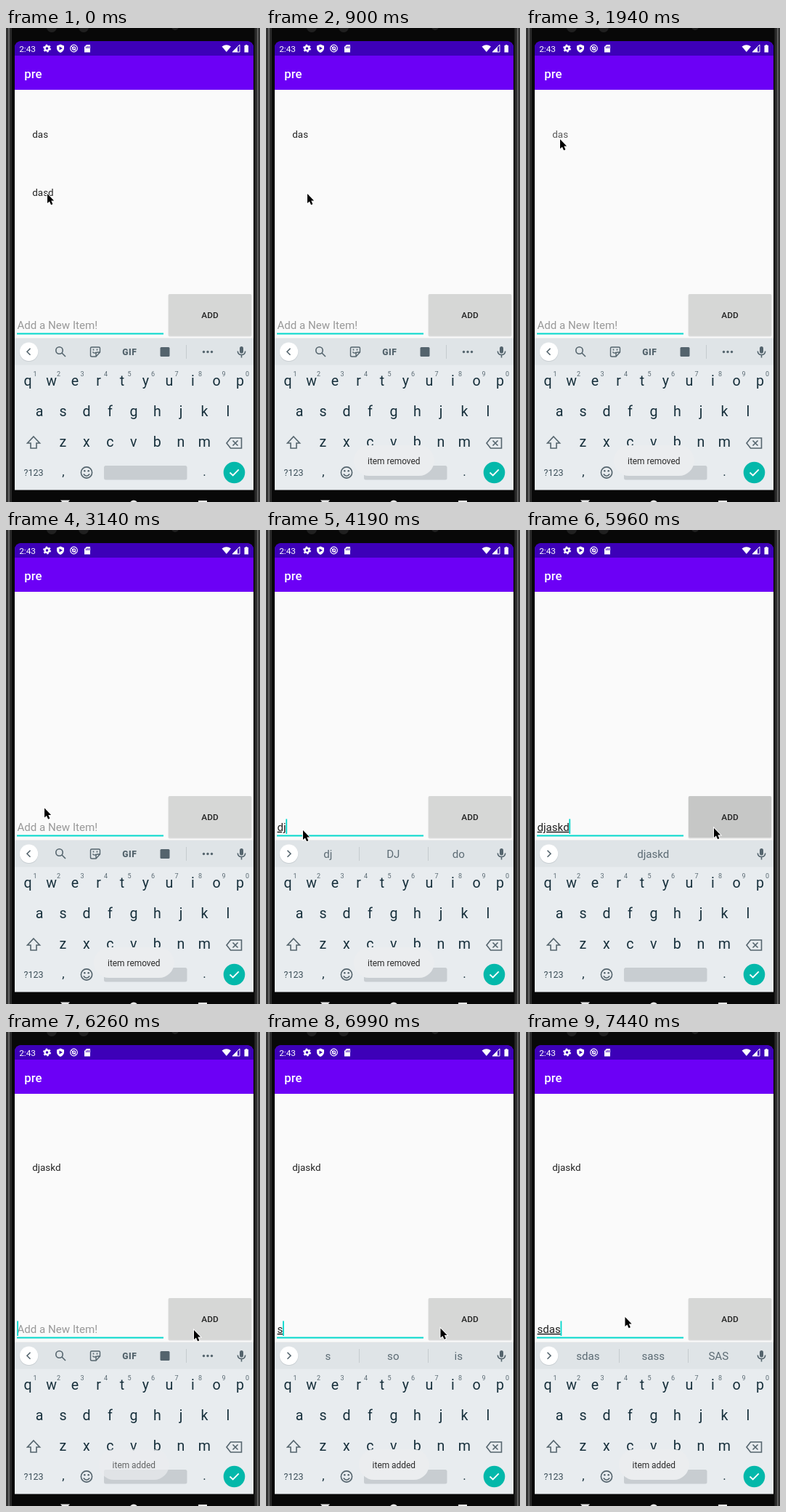
An HTML page that plays this animation: 350 px wide and 652 px high, repeating every 8000 ms.

```html
<!DOCTYPE html>
<html lang="en">
<head>
<meta charset="utf-8">
<title>List app</title>
<style>
html, body { margin: 0; width: 100%; height: 100%; overflow: hidden; background: #050505; }
svg { display: block; width: 100%; height: 100%; font-family: Roboto, sans-serif; }
.mid { text-anchor: middle; }
.line { fill: none; stroke: #54646d; stroke-width: 1.6; }
.key { font-size: 19.6px; fill: #17303c; text-anchor: middle; }
.dot { font-size: 17px; fill: #17303c; text-anchor: middle; }
.digit { font-size: 9px; fill: #5a6a73; text-anchor: middle; }
.item { font-size: 13.4px; fill: #222; }
.field { font-size: 15.1px; }
.word { font-size: 15.1px; fill: #5c6b74; text-anchor: middle; }
#typed { fill: #222; text-decoration: underline; text-decoration-skip-ink: none; }
</style>
</head>
<body>
<svg viewBox="0 0 350 652" preserveAspectRatio="none">
  <!-- phone body -->
  <rect width="350" height="652" fill="#080808"/>
  <g fill="#202020">
    <circle cx="63" cy="-1" r="7"/><circle cx="107" cy="-1" r="7"/><circle cx="233" cy="-2" r="5"/>
  </g>
  <path d="M1.500 0V652M348.500 0V652" stroke="#333" stroke-width="3"/>
  <path d="M4 0V652M346.500 0V652" stroke="#666" stroke-width="2"/>
  <path d="M6.500 0V652M344 0V652" stroke="#2a2a2a" stroke-width="3"/>
  <path d="M12 85V28Q12 18 22 18H331Q341 18 341 28V85Z" fill="#6c00f6"/>
  <path d="M12 38V28Q12 18 22 18H331Q341 18 341 28V38Z" fill="#3d00b8"/>
  <rect x="12" y="85" width="329" height="342" fill="#fafafa"/>
  <g fill="#e6e6e6">
    <path d="M75 649.5H88L81.5 657Z"/><circle cx="176" cy="655" r="5.5"/><rect x="265" y="650" width="12" height="8"/>
  </g>

  <!-- status bar -->
  <g fill="#fff">
    <text x="18.2" y="32.5" font-size="11.8">2:43</text>
    <text x="25.3" y="68.5" font-size="16.8" font-weight="500">pre</text>
    <g fill="none" stroke="#fff">
      <circle cx="56.5" cy="28" r="3" stroke-width="2.4"/>
      <circle cx="56.5" cy="28" r="4.7" stroke-width="1.6" stroke-dasharray="2.4 2.52"/>
      <circle cx="93.5" cy="28" r="4.8" stroke-width="1.2"/>
      <circle cx="93.5" cy="28" r="2.1" stroke-width="1.2"/>
      <path d="M90 25L97 32"/>
    </g>
    <path d="M75 22.5L80 24.5V28Q79.5 32 75 34Q70.5 32 70 28V24.5Z"/>
    <path d="M73.5 25.5L78 28L73.5 30.5Z" fill="#3d00b8"/>
    <path d="M111 23H116V33.5H108V26Z"/>
    <path d="M110.5 25.5V28M112.5 25V28M114.5 25V28" stroke="#3d00b8"/>
    <path d="M297.5 25.5Q303.8 20.8 310 25.5L303.8 33Z"/>
    <path d="M312 33L322 23V33Z" fill="none" stroke="#fff"/><path d="M312 33L319 26V33Z"/>
    <path d="M328.5 24H330V23H332.5V24H334V33.5H328.5Z"/>
  </g>

  <!-- list and input -->
  <text id="das" class="item" x="36.3" y="150.5">das</text>
  <text id="dasd" class="item" x="36.3" y="231">dasd</text>
  <text id="added" class="item" x="36.3" y="190.5">djaskd</text>
  <rect x="223.5" y="366" width="115" height="58.5" rx="2" opacity=".12"/>
  <rect id="button" x="224" y="366" width="114" height="57" rx="2"/>
  <text class="mid" x="281" y="398.8" font-size="11.8" font-weight="500" fill="#222">ADD</text>
  <text id="hint" class="field" x="15.5" y="413.8" fill="#989898">Add a New Item!</text>
  <text id="typed" class="field" x="15.5" y="413.8"></text>
  <rect x="15" y="419.5" width="202" height="2" fill="#03d8cc"/>
  <rect id="caret" y="397.5" width="1.8" height="20.5" fill="#03d8cc"/>

  <!-- keyboard -->
  <rect x="12" y="426" width="329" height="1" fill="#eee"/>
  <rect x="12" y="427" width="329" height="208.5" fill="#e8ecef"/>
  <rect x="12" y="427" width="329" height="36.5" fill="#dfe4e7"/>
  <circle cx="31.5" cy="446" r="13" fill="#b9c0c5" opacity=".6"/>
  <circle cx="31.5" cy="445.3" r="12.7" fill="#fff"/>
  <path id="chevron" class="line"/>
  <g id="tools">
    <g class="line">
      <circle cx="73.5" cy="443.5" r="4.7"/><path d="M77 447L82 452"/>
      <path d="M118 439H128Q129.5 439 129.5 440.5V446L124 452H118.5Q116.5 452 116.5 450.5V440.5Q116.5 439 118 439ZM129 446H126Q124 446 124 448V451M119.5 445.5Q121.5 448.5 124 446" stroke-width="1.4"/>
      <path d="M120.5 441.5V443.5M125.5 441.5V443.5"/>
    </g>
    <g fill="#54646d">
      <text class="mid" x="170.3" y="449.5" font-size="12" font-weight="800" letter-spacing=".5">GIF</text>
      <rect x="212.5" y="439" width="13" height="13" rx="1.5"/>
      <circle cx="272.5" cy="445.5" r="1.7"/><circle cx="278" cy="445.5" r="1.7"/><circle cx="283.5" cy="445.5" r="1.7"/>
    </g>
    <path d="M248.5 436V455" stroke="#c5cbcf"/>
  </g>
  <g id="words">
    <path id="bars" d="M128.5 436V455M223.5 436V455" stroke="#c5cbcf"/>
    <text class="word" x="85.3" y="451.3"></text>
    <text class="word" x="175.3" y="451.3"></text>
    <text class="word" x="265.3" y="451.3"></text>
  </g>
  <rect x="322" y="438" width="5" height="9.5" rx="2.5" fill="#54646d"/>
  <path class="line" d="M319.3 444.5Q319.5 449.5 324.5 449.5Q329.5 449.5 329.7 444.5M324.5 449.5V453.5" stroke-width="1.4"/>
  <g id="keys"></g>
  <g class="line">
    <path d="M38 562L46.5 571H42V578H34V571H29.5Z"/>
    <path d="M309.5 564H324.5V578H309.5L304 571ZM312.5 567.5L319.5 574.5M319.5 567.5L312.5 574.5"/>
    <circle cx="111" cy="611.5" r="7.6"/><path d="M106.8 613.5Q111 619 115.2 613.5"/>
  </g>
  <circle cx="108.3" cy="609.3" r="1.3" fill="#54646d"/><circle cx="113.7" cy="609.3" r="1.3" fill="#54646d"/>
  <text class="mid" x="38" y="616.2" font-size="12.5" fill="#3c4f59">?123</text>
  <rect x="135" y="602" width="114.5" height="19.5" rx="2.5" fill="#c8cdd1"/>
  <circle cx="314.5" cy="611.5" r="14.8" fill="#03b8aa"/>
  <path d="M308.5 611.5L312.7 615.5L320.7 607.3" fill="none" stroke="#fff" stroke-width="1.8"/>

  <g id="toast">
    <rect y="574" height="42" rx="21" fill="#ebedef"/>
    <text class="mid" x="176.3" y="600" font-size="11.9" fill="#2a2a2a"></text>
  </g>
  <path id="pointer" d="M.5 1.5V14.5L3.4 11.9L5.6 16.8L7.9 15.8L5.8 11H9.6Z" stroke="#fff" stroke-width="1.8" paint-order="stroke"/>
</svg>
<script>
const $ = id => document.getElementById(id);

function addKey(cls, x, y, label) {
  const el = document.createElementNS('http://www.w3.org/2000/svg', 'text');
  el.setAttribute('class', cls);
  el.setAttribute('x', x);
  el.setAttribute('y', y);
  el.textContent = label;
  $('keys').append(el);
}
[['qwertyuiop', 30, 492], ['asdfghjkl', 46, 533.5], ['zxcvbnm', 78.3, 576.3]].forEach(([row, x, y]) =>
  [...row].forEach((c, i) => addKey('key', x + 32.5 * i, y, c)));
[...'1234567890'].forEach((c, i) => addKey('digit', 40 + 32.5 * i, 478.5, c));
addKey('dot', 79, 616, ',');
addKey('dot', 273.5, 616, '.');

// Each track holds [start time, value]; a value lasts until the next start.
const tracks = {
  pointer: [[0, [56.5, 226.5]], [1200, [50, 180]], [1340, [46.5, 151.5]],
    [2840, [48, 195]], [2990, [51, 305]], [3140, [52.5, 381]], [3290, [52, 403]], [3440, [50.5, 411.5]],
    [5220, [82.5, 420.5]], [5370, [150, 431]], [5520, [225, 423]], [5670, [258.5, 408.5]],
    [6990, [240, 406]], [7140, [190, 398]], [7290, [150, 392]], [7440, [136, 390.5]]],
  caret: [[0, 0], [450, 1], [900, 0], [1340, 1], [1940, 0], [2390, 1], [2840, 0], [3440, 1], [3890, 0],
    [4190, 1], [5220, 0], [5670, 1], [6690, 0], [6990, 1]],
  das: [[0, 1], [1940, .75], [2090, 0]],
  dasd: [[0, 1], [450, .75], [600, 0]],
  added: [[0, 0], [6110, 1]],
  toast: [[0, 0], [600, .6], [750, 1], [2390, .5], [2540, 0], [2840, .6], [2990, 1], [4630, .5], [4780, 0],
    [6260, .7], [6400, 1]],
  button: [[0, '#d6d7d6'], [5960, '#c6c7c6'], [6110, '#cbcccb'], [6260, '#d6d7d6']],
  typed: [[0, ''], [4190, 'dj'], [4340, 'dja'], [4490, 'djas'], [4630, 'djask'], [4780, 'djaskd'],
    [6110, ''], [6990, 's'], [7140, 'sd'], [7290, 'sda'], [7440, 'sdas']]
};
const suggestions = {
  dj: 'dj DJ do', dja: 'dja DJ da', djas: 'djas das DJs',
  s: 's so is', sd: 'sd SD as', sda: 'sda SDA sad', sdas: 'sdas sass SAS'
};
const at = (name, t) => tracks[name].findLast(([start]) => start <= t)[1];
const show = (id, on) => $(id).style.opacity = +on;

function draw(t) {
  const typed = at('typed', t), words = suggestions[typed]?.split(' ') ?? ['', typed, ''];
  for (const id of ['das', 'dasd', 'added', 'toast', 'caret']) show(id, at(id, t));
  $('pointer').setAttribute('transform', `translate(${at('pointer', t)})`);
  $('button').style.fill = at('button', t);

  $('typed').textContent = typed;
  $('caret').setAttribute('x', 15.2 + (typed ? $('typed').getComputedTextLength() : 0));
  $('chevron').setAttribute('d', typed ? 'M29.5 440.8L34 445.3L29.5 449.8' : 'M33.5 440.8L29 445.3L33.5 449.8');
  show('hint', !typed);
  show('tools', !typed);
  show('words', !!typed);
  show('bars', words[0] !== '');
  document.querySelectorAll('.word').forEach((el, i) => el.textContent = words[i]);

  const adding = t > 6000, box = $('toast').firstElementChild, half = adding ? 48.5 : 55.5;
  box.setAttribute('x', 176.3 - half);
  box.setAttribute('width', 2 * half);
  $('toast').lastElementChild.textContent = adding ? 'item added' : 'item removed';
}

const begin = performance.now();
function tick() {
  draw((performance.now() - begin) % 8000);
  requestAnimationFrame(tick);
}
tick();
</script>
</body>
</html>
```
